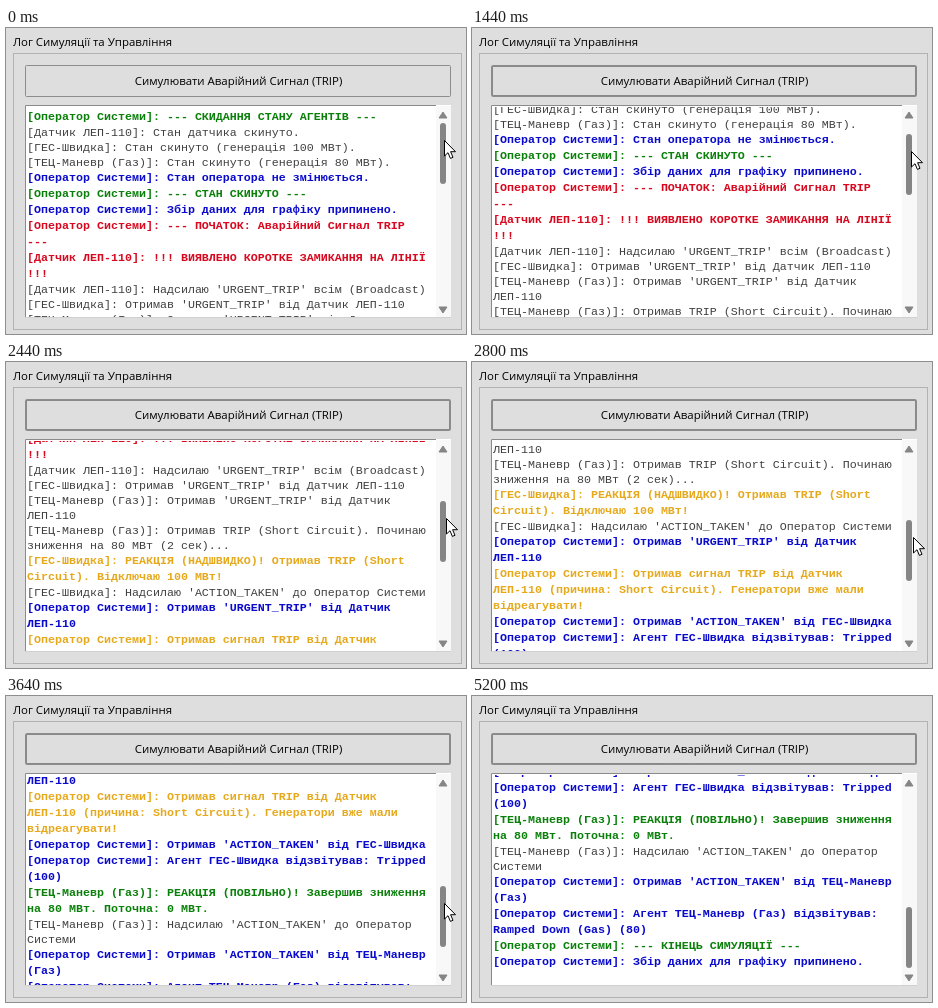
These frames come from a looping animation (460 px wide and 306 px high, 5240 ms). An HTML page:

```html
<!DOCTYPE html>
<html lang="uk">
<head>
<meta charset="utf-8">
<style>
html, body { margin: 0; width: 100%; height: 100%; overflow: hidden; background: #dedede; }
svg { display: block; width: 460px; height: 306px; }
.ui { font: 11.45px "Open Sans", "Noto Sans", sans-serif; fill: #000; }
#log { font: 11.667px "Liberation Mono", "Courier New", monospace; }
.k { fill: #404040; }
.g, .b, .r, .o { font-weight: bold; }
.g { fill: #0a800a; }
.b { fill: #0a0acd; }
.r { fill: #d8081f; }
.o { fill: #e6a91c; }
</style>
</head>
<body>
<svg viewBox="0 0 460 306">
  <clipPath id="view"><rect x="20" y="79" width="410" height="210"/></clipPath>
  <rect width="460" height="306" fill="#dedede"/>
  <text class="ui" x="7" y="18">Лог Симуляції та Управління</text>
  <rect x="7.5" y="25.5" width="448" height="276" fill="none" stroke="#b2b2b2"/>
  <rect x="19.5" y="37.5" width="425" height="31" rx="1" fill="#dedede" stroke="#8c8c8c"/>
  <rect id="focus" x="20.5" y="38.5" width="423" height="29" fill="none" stroke="#333" stroke-dasharray="1 1"/>
  <text class="ui" x="232.5" y="57" text-anchor="middle">Симулювати Аварійний Сигнал (TRIP)</text>
  <rect x="19" y="77" width="426" height="213" fill="#fff"/>
  <path d="M19.5 290V77.5H430" fill="none" stroke="#8a8a8a"/>
  <path d="M19 289.5H445" stroke="#d0d0d0"/>
  <g clip-path="url(#view)"><g id="log"></g></g>
  <rect x="430" y="78" width="15" height="211" fill="#f8f8f8"/>
  <path d="M433 90l4-6 4 6zM433 279l4 6 4-6z" fill="#858585" stroke="#858585" stroke-linejoin="round"/>
  <rect id="thumb" x="434" width="6" height="61" rx="3" fill="#858585"/>
  <path id="cursor" d="M.5 .5V16L4 12.7 6.4 18.4 9 17.3 6.6 11.7H11.5Z" fill="#fff" stroke="#000"/>
</svg>
<script>
const LOOP = 5240, STEP = 40, GRAB_Y = 112, MAX_DRAG = 116, SCROLL_PER_PX = 3.474;
const OP = '[Оператор Системи]: ', LINE = '[Датчик ЛЕП-110]: ',
      HYDRO = '[ГЕС-Швидка]: ', HEAT = '[ТЕЦ-Маневр (Газ)]: ';

// One entry per message: style, then its wrapped rows.
const messages = [
  ['g', OP + '--- СКИДАННЯ СТАНУ АГЕНТІВ ---'],
  ['k', LINE + 'Стан датчика скинуто.'],
  ['k', HYDRO + 'Стан скинуто (генерація 100 МВт).'],
  ['k', HEAT + 'Стан скинуто (генерація 80 МВт).'],
  ['b', OP + 'Стан оператора не змінюється.'],
  ['g', OP + '--- СТАН СКИНУТО ---'],
  ['b', OP + 'Збір даних для графіку припинено.'],
  ['r', OP + '--- ПОЧАТОК: Аварійний Сигнал TRIP', '---'],
  ['r', LINE + '!!! ВИЯВЛЕНО КОРОТКЕ ЗАМИКАННЯ НА ЛІНІЇ', '!!!'],
  ['k', LINE + "Надсилаю 'URGENT_TRIP' всім (Broadcast)"],
  ['k', HYDRO + "Отримав 'URGENT_TRIP' від Датчик ЛЕП-110"],
  ['k', HEAT + "Отримав 'URGENT_TRIP' від Датчик", 'ЛЕП-110'],
  ['k', HEAT + 'Отримав TRIP (Short Circuit). Починаю', 'зниження на 80 МВт (2 сек)...'],
  ['o', HYDRO + 'РЕАКЦІЯ (НАДШВИДКО)! Отримав TRIP (Short', 'Circuit). Відключаю 100 МВт!'],
  ['k', HYDRO + "Надсилаю 'ACTION_TAKEN' до Оператор Системи"],
  ['b', OP + "Отримав 'URGENT_TRIP' від Датчик", 'ЛЕП-110'],
  ['o', OP + 'Отримав сигнал TRIP від Датчик', 'ЛЕП-110 (причина: Short Circuit). Генератори вже мали', 'відреагувати!'],
  ['b', OP + "Отримав 'ACTION_TAKEN' від ГЕС-Швидка"],
  ['b', OP + 'Агент ГЕС-Швидка відзвітував: Tripped', '(100)'],
  ['g', HEAT + 'РЕАКЦІЯ (ПОВІЛЬНО)! Завершив зниження', 'на 80 МВт. Поточна: 0 МВт.'],
  ['k', HEAT + "Надсилаю 'ACTION_TAKEN' до Оператор", 'Системи'],
  ['b', OP + "Отримав 'ACTION_TAKEN' від ТЕЦ-Маневр", '(Газ)'],
  ['b', OP + 'Агент ТЕЦ-Маневр (Газ) відзвітував:', 'Ramped Down (Gas) (80)'],
  ['g', OP + '--- КІНЕЦЬ СИМУЛЯЦІЇ ---'],
  ['b', OP + 'Збір даних для графіку припинено.']
];

// Pointer path: time, x, y.
const path = [
  [0, 438, 112], [1440, 439, 123], [2080, 439, 139], [2800, 441, 175.4],
  [3640, 438, 207], [4040, 437, 223], [4480, 437, 240], [4680, 437, 253],
  [LOOP, 437, 253]
];

const el = id => document.getElementById(id);
const move = (id, x, y) => el(id).setAttribute('transform', `translate(${x} ${y})`);

let rowY = 92;
for (const [style, ...rows] of messages) {
  for (const row of rows) {
    const text = document.createElementNS('http://www.w3.org/2000/svg', 'text');
    text.setAttribute('class', style);
    text.setAttribute('x', 21);
    text.setAttribute('y', rowY);
    text.textContent = row;
    el('log').append(text);
    rowY += style === 'k' ? 15 : 16;
  }
}

// Slope of one path column over segment i, and the smooth slope at key i.
const slope = (i, c) => (path[i + 1][c] - path[i][c]) / (path[i + 1][0] - path[i][0]);
function tangent(i, c) {
  if (i === 0 || i === path.length - 1) return 0;
  const a = slope(i - 1, c), b = slope(i, c);
  return a * b > 0 ? 2 * a * b / (a + b) : 0;
}

// Monotone cubic through the path keys.
function pathAt(t, c) {
  const i = path.findIndex(p => p[0] > t) - 1;
  const [p, q] = [path[i], path[i + 1]];
  const span = q[0] - p[0], u = (t - p[0]) / span, v = 1 - u;
  return p[c] * v * v * (1 + 2 * u) + q[c] * u * u * (3 - 2 * u)
    + span * u * v * (v * tangent(i, c) - u * tangent(i + 1, c));
}

function draw() {
  const t = Math.floor(performance.now() % LOOP / STEP) * STEP;
  const x = Math.round(pathAt(t, 1)), y = Math.round(pathAt(t, 2));
  // The thumb follows the pointer in whole pixels until the log ends.
  const drag = Math.min(MAX_DRAG, y - GRAB_Y);
  move('log', 0, -Math.round(drag * SCROLL_PER_PX));
  move('thumb', 0, 95 + drag);
  move('cursor', x, y);
  el('cursor').style.display = t < 4920 ? '' : 'none';
  el('focus').style.display = t < STEP ? 'none' : '';
  requestAnimationFrame(draw);
}
draw();
</script>
</body>
</html>
```
